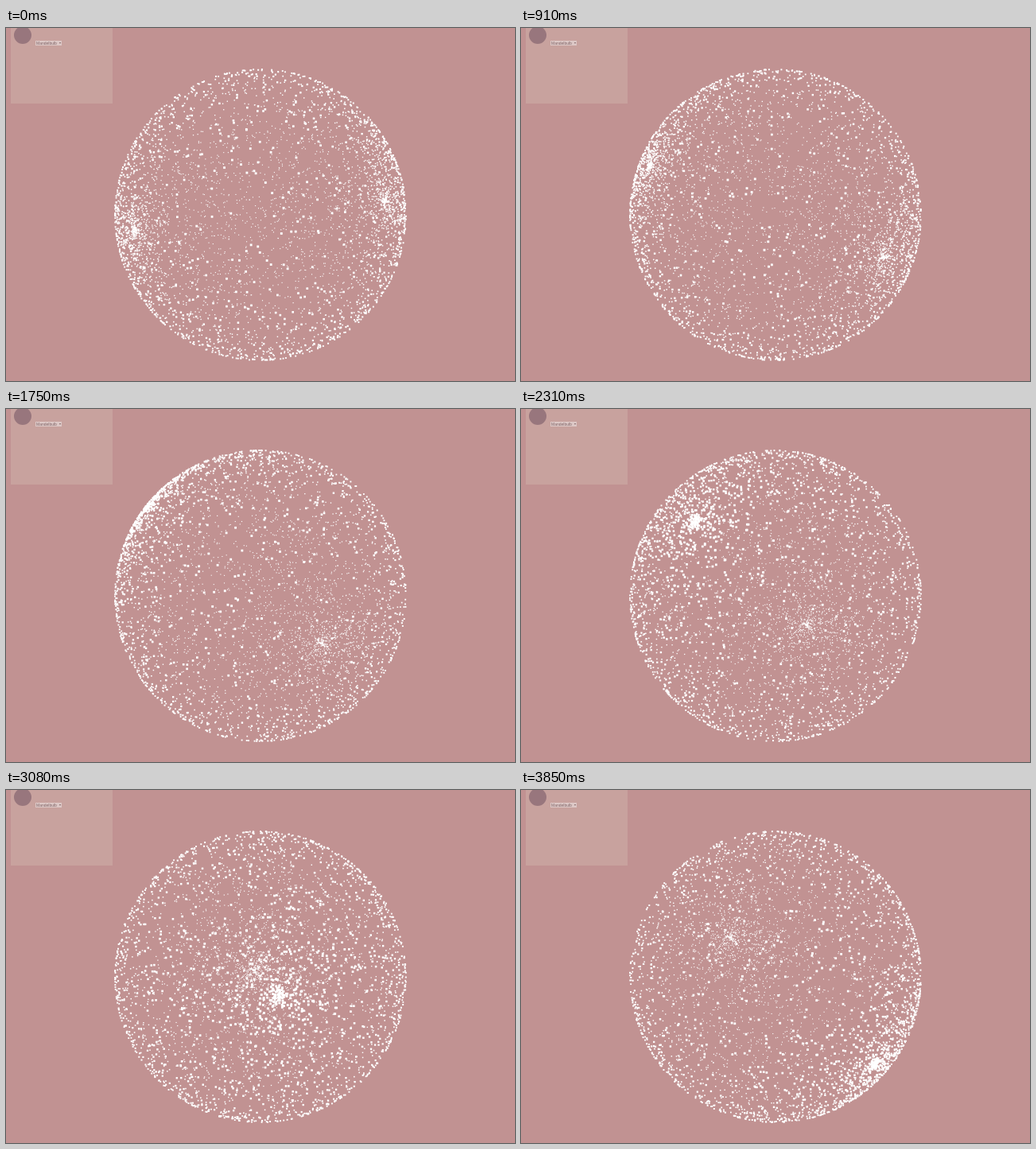
Animation, 640 px wide and 444 px high, one loop 3.92 s. Source, as an HTML page with a canvas:

```html
<!DOCTYPE html>
<html lang="en">
<head>
<meta charset="utf-8">
<title>Spinning point sphere</title>
<style>
  html, body { margin: 0; width: 100%; height: 100%; overflow: hidden; background: #c19292; }
  #stage { position: relative; width: 640px; height: 444px; overflow: hidden; }
  canvas { position: absolute; left: 0; top: 0; }
  .panel { position: absolute; left: 5.5px; top: 0; width: 128px; height: 95px; background: #c8a29e; }
  .knob { position: absolute; left: 10px; top: -2px; width: 22px; height: 22px; border-radius: 50%; background: #98767d; }
  .label {
    position: absolute; left: 37px; top: 15.5px; width: 33px; height: 6px; box-sizing: border-box;
    padding-left: 1px; background: #ddc8c6; color: #806568;
    font: 5px/6px "Liberation Sans", sans-serif; white-space: nowrap;
  }
  .label::after {
    content: ""; position: absolute; right: 1.5px; top: 2px;
    border: 1.2px solid transparent; border-top: 2px solid #806568; border-bottom: 0;
  }
</style>
</head>
<body>
<div id="stage">
  <div class="panel"></div>
  <div class="knob"></div>
  <div class="label">Mandelbulb</div>
  <canvas width="640" height="444"></canvas>
</div>
<script>
const ctx = document.querySelector("canvas").getContext("2d");
const COUNT = 4400, STEP = 70, STEPS = 56;
const CX = 320, CY = 235, FOCAL = 317, CAMERA = 2, DOT = 2.9, MIN_DOT = 1.1;
const START = -96.5 * Math.PI / 180, TURN = 0.04;

let seed = 20117;
function random() {
  seed = (seed + 0x6D2B79F5) | 0;
  let n = Math.imul(seed ^ (seed >>> 15), seed | 1);
  n ^= n + Math.imul(n ^ (n >>> 7), n | 61);
  return ((n ^ (n >>> 14)) >>> 0) / 4294967296;
}

// Even angles crowd the points around both poles.
const points = Array.from({ length: COUNT }, () => {
  const theta = random() * Math.PI, phi = random() * Math.PI * 2;
  return [Math.sin(theta) * Math.cos(phi), Math.sin(theta) * Math.sin(phi), Math.cos(theta)];
});

function draw(step) {
  const angle = START + step * TURN, c = Math.cos(angle), s = Math.sin(angle);
  ctx.clearRect(0, 0, 640, 444);
  ctx.fillStyle = "#fff";
  for (const [x, y, z] of points) {
    // Turn about the y axis, then about the x axis by the same angle.
    const px = x * c + z * s, depth = z * c - x * s;
    const py = y * c - depth * s, pz = y * s + depth * c;
    const scale = 1 / (CAMERA - pz), size = Math.max(MIN_DOT, DOT * scale);
    ctx.fillRect(CX + FOCAL * px * scale - size / 2, CY - FOCAL * py * scale - size / 2, size, size);
  }
}

const begin = performance.now();
let shown = -1;
function tick() {
  const step = Math.floor((performance.now() - begin) / STEP) % STEPS;
  if (step !== shown) draw(shown = step);
  requestAnimationFrame(tick);
}
tick();
</script>
</body>
</html>
```
